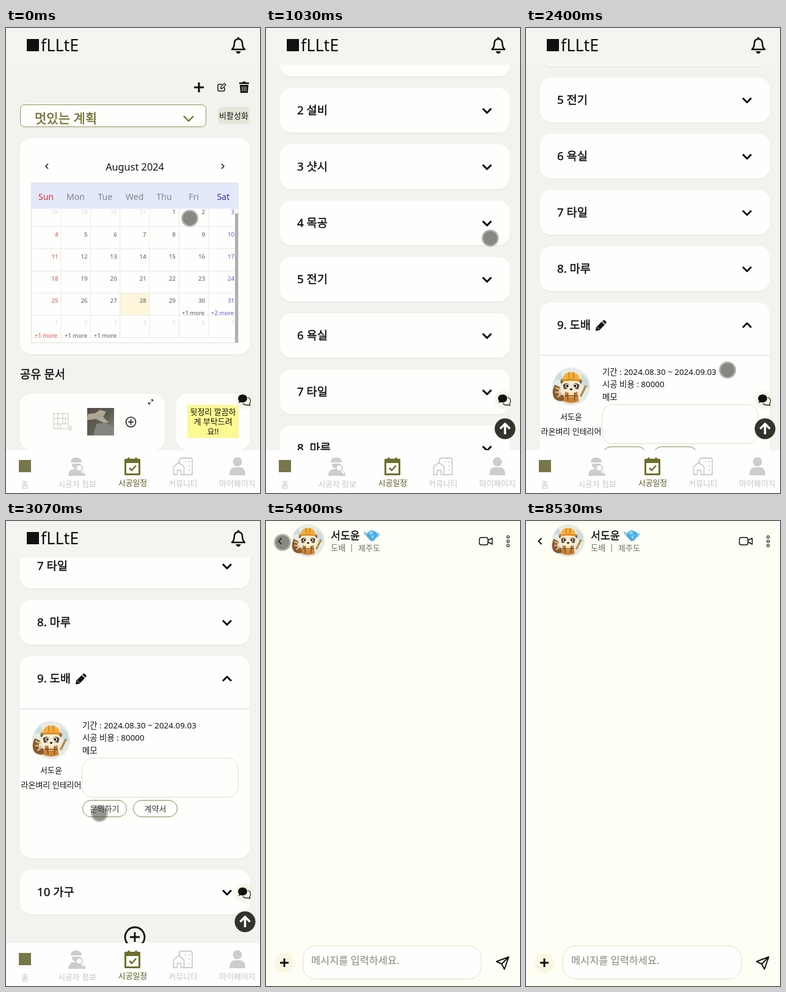
Recreate the animation shown at these times as an HTML page. Size 416x760 px, loop 8.61 s.

```html
<!DOCTYPE html>
<html lang="ko">
<head>
<meta charset="utf-8">
<style>
html, body { margin: 0; width: 100%; height: 100%; overflow: hidden; background: #f2f2ef }
svg { display: block; font-family: "Noto Sans", "Noto Sans CJK KR", "Noto Sans CJK", sans-serif }
text { white-space: pre }
</style>
</head>
<body>
<svg id="stage" width="416" height="760" viewBox="0 0 416 760"></svg>
<script>
const INK = '#111110', OLIVE = '#6f6f2c', PALE = '#cdcdc9', PAPER = '#fefefd', PAGE = '#f2f2ef';
const PERSON = '서도윤', SHOP = '라온벼리 인테리어';
const LOOP = 8610, BLANK_AT = 3450, CHAT_AT = 4000;

// Drawing helpers; text is placed by its vertical centre, medium weight is a hairline outline.
const text = (x, cy, size, str, fill = INK, anchor = 'start', medium = false) =>
  `<text x="${x}" y="${cy + size * .36}" font-size="${size}" fill="${fill}" text-anchor="${anchor}"${medium ? ` stroke="${fill}" stroke-width=".45"` : ''}>${str}</text>`;
const rect = (x, y, w, h, r, fill, stroke = 'none', extra = '') =>
  `<rect x="${x}" y="${y}" width="${w}" height="${h}" rx="${r}" fill="${fill}" stroke="${stroke}" ${extra}/>`;
const circle = (x, y, r, fill, stroke = 'none', sw = 1) =>
  `<circle cx="${x}" cy="${y}" r="${r}" fill="${fill}" stroke="${stroke}" stroke-width="${sw}"/>`;
const line = (d, stroke = INK, sw = 2, fill = 'none') =>
  `<path d="${d}" fill="${fill}" stroke="${stroke}" stroke-width="${sw}" stroke-linejoin="round"/>`;
const fillPath = (d, fill = INK) => `<path d="${d}" fill="${fill}"/>`;
const group = (x, y, body, id = '') => `<g id="${id}" transform="translate(${x} ${y})">${body}</g>`;
const card = (x, y, w, h, id = '') =>
  rect(x, y + 1.5, w, h, 18, '#e8e8e4', 'none', id && `id="${id}Edge"`) +
  rect(x, y, w, h, 18, PAPER, 'none', id && `id="${id}"`);
const down = (x, y, w, sw, color = INK) => line(`M${x - w} ${y - w / 2}l${w} ${w}l${w} ${-w}`, color, sw);
const plus = (x, y, r, sw) => line(`M${x - r} ${y}h${2 * r}M${x} ${y - r}v${2 * r}`, INK, sw);
const expand = (x, y) => line(`M${x + .5} ${y - 3.5}h3v3M${x + 3.5} ${y - 3.5}l-3 3M${x - .5} ${y + 3.5}h-3v-3M${x - 3.5} ${y + 3.5}l3 -3`, INK, 1);

const raccoon = (x, y, r) => `<g transform="translate(${x} ${y}) scale(${r / 31})">` +
  circle(0, 0, 31, '#e6ebe6') +
  fillPath('M-27 -12L-18 -24L-12 -10zM15 -22L27 -12L29 3L19 0z', '#cbdcdc') + '<g transform="scale(.9)">' +
  line('M-13 20C-31 25 -30 9 -25 -1', '#8a5a30', 11) +
  line('M-29 2l10 4M-29 10l10 1M-25 19l8 -6', '#dcb47a', 3) +
  fillPath('M-11 9h22l3 18q-14 6 -28 0z', '#cd8434') +
  fillPath('M-6 10h12v9h-12z', '#f3dfa9') + line('M-12 17H12M-6 9v17M6 9v17', '#74451d', 1.6) +
  circle(-15, -9, 4.5, '#74553a') + circle(15, -9, 4.5, '#74553a') +
  `<ellipse cy="-1" rx="18" ry="13" fill="#f8edd2"/>` +
  fillPath('M-15 -3Q-8 -9 -3 -3Q-5 5 -13 5zM15 -3Q8 -9 3 -3Q5 5 13 5z', '#5b452f') +
  circle(-7, -1, 3.6, '#fff') + circle(7, -1, 3.6, '#fff') + circle(-7, -1, 2.3, '#161006') + circle(7, -1, 2.3, '#161006') +
  `<ellipse cy="5" rx="2.5" ry="1.7" fill="#24180c"/>` +
  fillPath('M-16 -10Q-15 -26 0 -26Q15 -26 16 -10z', '#f6ad38') + line('M-19 -10Q0 -15 19 -10M-4 -26v11M4 -26v11', '#d0821f', 2) +
  line('M17 18L27 -2', '#b48d4c', 4) + '</g></g>';

function calendar() {
  const xs = i => 41.5 + i * 48.4, rule = '#e8e8ea', red = '#e04a3c', blue = '#5a5ad0', grey = '#565650';
  let out = card(23, 180, 376, 353) + text(211, 227, 16.3, 'August 2024', INK, 'middle') +
    line('M69 222l-4 4l4 4M353 222l4 4l-4 4', INK, 1.5) +
    rect(xs(3), 434, 48.4, 36, 0, '#fdf6da') + rect(41.5, 253.5, 339, 42, 0, '#e1e9fb');
  for (let i = 1; i < 7; i++) out += line(`M${xs(i)} 253V506`, rule, 1);
  for (let i = 0; i < 6; i++) out += line(`M41 ${324.5 + i * 36.3}H380`, rule, 1);
  out += rect(41.5, 253.5, 339, 261, 0, 'none', '#dfdfdf');
  ['Sun', 'Mon', 'Tue', 'Wed', 'Thu', 'Fri', 'Sat'].forEach((d, i) =>
    out += text(xs(i) + 24, 275.5, 14, d, i ? i == 6 ? '#3030a4' : '#868686' : '#e0302c', 'middle'));
  for (let i = 0; i < 42; i++) {
    const n = (i + 27) % 31 + 1, col = i % 7, otherMonth = i < 4 || i > 34;
    const ink = col ? col == 6 ? [blue, '#d8d8f0'] : [grey, '#dcdcd8'] : [red, '#f4d4cc'];
    out += text(85.5 + col * 48.1, 301 + (i / 7 | 0) * 36.2, 9.7, n, ink[+(otherMonth && i != 6)], 'end');
  }
  const more = (x, y, n, c = grey) => text(x, y, 9.5, `+${n} more`, c);
  return out + more(288, 466, 1) + more(336, 466, 2, blue) + more(47, 503, 1, red) + more(96, 503, 1) + more(144, 503, 1) +
    rect(375, 303, 5, 211, 0, '#b0b0ac', 'none', 'id="bar"');
}

const documents = () => text(23, 566, 18.8, '공유 문서', INK, 'start', true) +
  card(23, 598, 237, 92) + card(279, 598, 120, 92) +
  line('M78 630h24v25h-24zM78 638h24M85 630v25M93 630v17M78 647h24M97 638v9M89 647v8M104 651h3v6h-3z', '#c6c6b8', 1) +
  rect(133, 621, 44, 45, 0, 'url(#photo)') +
  fillPath('M134 631l13 -2l7 -5l10 3l-5 9l9 8l-6 2l-15 -7l-14 2z', '#b0a696') +
  fillPath('M143 666l5 -19l15 -2l14 7v14z', '#858480') +
  circle(204.5, 644, 8, 'none', INK, 1.5) + plus(204.5, 644, 4.5, 1.5) + expand(237, 611) +
  rect(297, 616, 84, 54, 0, '#fcf992') +
  ['뒷정리 깔끔하', '게 부탁드려', '요!!'].map((s, i) => text(339, 627.5 + i * 15.7, 13, s, INK, 'middle')).join('') +
  expand(387, 611) +
  text(399, 722, 19.3, '총 시공 가격 : 340,000원', INK, 'end', true);

const planBar = () => plus(316, 97, 8, 3.2) +
  line('M354 92h-5q-2 0 -2 2v7q0 2 2 2h7q2 0 2 -2v-4', INK, 1.5) + line('M351.5 99l.5 -3l5.5 -5.5l2.5 2.5l-5.5 5.5z', INK, 1.3) +
  fillPath('M382 89h5l1 -1.5h4l1 1.5h5v2.5h-16zM383 93h14l-1 13h-12z') + line('M387 95.5v8M390 95.5v8M393 95.5v8', PAGE, 1) +
  rect(23.5, 125.5, 304, 36, 7, PAPER, '#96965a') + text(47, 147, 21, '멋있는 계획', OLIVE, 'start', true) +
  down(299, 148, 8, 2.4, OLIVE) +
  rect(347, 129, 52, 28, 8, '#e6e6d8') + text(373, 143, 13, '비활성화', INK, 'middle');

const taskTitle = (y, title) => text(51, y + 36, 18.7, title, INK, 'start', true);
const task = (y, title) => card(23, y, 376, 73) + taskTitle(y, title) + down(362, y + 37, 7, 3);
const pill = (x, label) => rect(x + .5, 235.5, 72, 27, 13.5, PAPER, '#8a8a50') + text(x + 36.5, 249, 13, label, '#333', 'middle');

const openTask = () => card(23, 0, 376, 73, 'openCard') + taskTitle(0, '9. 도배') +
  fillPath('M114 46l1 -6l9 -9l5 5l-9 9zM125 30l3 -2l4 4l-2 3z') + line('M117 40l3 3', PAPER, 1) +
  `<g id="arrow">${down(0, 0, 7, 3)}</g><g clip-path="url(#open)">` +
  line('M23 86H399', '#dededa', 1.5) + raccoon(74, 137, 31) +
  text(74, 186.5, 13, PERSON, INK, 'middle') + text(74, 210.5, 13, SHOP, INK, 'middle') +
  text(125, 113, 13.4, '기간 : 2024.08.30 ~ 2024.09.03') + text(125, 133, 13.4, '시공 비용 : 80000') + text(125, 154, 13.4, '메모') +
  rect(124.5, 166.5, 256, 64, 18, PAPER, '#dedec8') + pill(125, '문의하기') + pill(208, '계약서') + '</g>';

const header = rect(0, 0, 416, 60, 0, '#f4f4f1') + rect(34, 18, 20, 20, 0, INK) + text(57, 28, 27, 'fLLtE') +
  line('M370 35q4 -3 4 -11q1 -6 6.5 -6q5.5 0 6.5 6q0 8 4 11z', INK, 2.5) + line('M380.5 15v3', INK, 3) + fillPath('M376.5 38h8q-1 4 -4 4t-4 -4z');

const nav = rect(0, 690, 416, 70, 0, '#fefefe') + rect(21, 706, 20, 20, 0, '#77774a') +
  fillPath('M106 710q0 -7 7 -8h4q7 1 7 8zM108 712h14q0 8 -7 8t-7 -8zM102 732q0 -10 8 -11h10q10 1 10 11z', PALE) +
  circle(120, 719, 5, '#fefefe', PALE, 2) + line('M123.5 723l4 5', '#fefefe', 2.5) +
  line('M195.5 705.5h23v24h-23z', OLIVE, 3) + line('M195 708.5h24', OLIVE, 5) + line('M201 702v4M213 702v4', OLIVE, 3) + line('M202 719l4 4l7 -8', OLIVE, 2.5) +
  line('M284 711V706q0 -3 3 -3h15q3 0 3 3v24h-16M274.5 717l8.5 -7l8.5 7v13h-5v-7h-6v7h-6zM293 709h2M299 709h2M299 716h2M299 723h2', PALE, 1.8) +
  circle(379, 709, 7.5, PALE) + fillPath('M366 731q0 -13 9 -13h8q9 0 9 13z', PALE) +
  [[31, 746, '홈'], [116.5, 745, '시공자 정보'], [207.5, 743.5, '시공일정', '#55551c'], [290, 744, '커뮤니티'], [379, 744, '마이페이지']]
    .map(([x, y, s, c = '#c4c4c0']) => text(x, y, 12.9, s, c, 'middle')).join('');

const floating = circle(390, 608, 18, 'url(#halo)') +
  line('M396 603.5q5 2 4.5 7q0 2.5 -2 4l1.5 2.5l-4.5 -1q-5 1 -7.5 -2.5', '#333', 1.3) +
  fillPath('M380.5 613l1.5 -3q-2 -2 -2 -5q1 -6 7.5 -6q7 0 7.5 6.5q-.5 6.5 -7.5 6.5q-2 0 -3.5 -.5z') +
  `<g id="top">${circle(391.5, 655, 17, '#33332c')}${line('M391.5 664v-17M383.5 655l8 -8l8 8', PAPER, 3.6)}</g>`;

const chat = line('M25.5 28l-5 5l5 5', INK, 2) + raccoon(69, 32, 27) +
  text(106, 24, 17.3, PERSON, INK, 'start', true) +
  fillPath('M168 22l-8 -6l1 6l6 5zM180 18l7 3l-3 5l-6 2z', '#8accf0') + fillPath('M166 19l6 -4l7 2l4 6l-6 9l-5 1l-7 -8z', '#4aaae8') + fillPath('M168 19l5 -3l3 4l-5 3zM172 25l6 -3l-3 8z', '#8bd3f6') +
  text(106, 44, 13.3, '도배', '#6e6e66') + text(140, 43, 13, '|', '#6e6e66', 'middle') + text(151, 44, 13, '제주도', '#6e6e66') +
  rect(349.5, 27, 14, 12, 3, 'none', INK, 'stroke-width="1.5"') + line('M364 31.5l6.5 -3.5v10l-6.5 -3.5', INK, 1.5) +
  [26, 33, 40].map(y => circle(396.5, y, 2, 'none', INK, 1.1)).join('') +
  circle(30, 722, 16, '#f8f8e2') + plus(30, 722, 7, 3) +
  rect(60.5, 694.5, 292, 54, 20, PAPER, '#dcdccc') + text(74, 718.5, 16.4, '메시지를 입력하세요.', '#85857a') +
  line('M377.5 720l20 -7.5l-7 20l-4.5 -8.5zM386 724l11 -11', INK, 2);

const names = ['1 철거', '2 설비', '3 샷시', '4 목공', '5 전기', '6 욕실', '7 타일', '8. 마루'];
const $ = id => document.getElementById(id);
$('stage').innerHTML = `<defs>
  <linearGradient id="photo" x2="1" y2="1"><stop stop-color="#50504a"/><stop offset=".5" stop-color="#5d5c54"/><stop offset="1" stop-color="#8e8d86"/></linearGradient>
  <radialGradient id="halo"><stop offset=".6" stop-color="#f3f3e4"/><stop offset="1" stop-color="#f3f3e4" stop-opacity="0"/></radialGradient>
  <clipPath id="open"><rect id="openClip" x="23" y="74" width="376" height="0"/></clipPath></defs>` +
  rect(0, 0, 416, 760, 0, PAGE) +
  group(0, 0, planBar() + calendar() + documents() + names.map((n, i) => task(754 + i * 92, n)).join('') +
    group(0, 1490, openTask()) +
    group(0, 0, task(0, '10 가구') + circle(211, 110, 16, 'none', INK, 2.8) + plus(211, 110, 8, 2.8), 'tail'), 'page') +
  header + nav + floating + rect(0, 0, 416, 760, 0, '#fefef4', 'none', 'id="blank"') + `<g id="chat">${chat}</g>` +
  `<g id="touch"><g opacity=".4">${circle(0, 0, 14, '#4a4a44')}</g><g opacity=".4">${circle(0, 0, 11.5, '#44443c')}</g></g>`;

const clamp = v => Math.max(0, Math.min(1, v));
const mix = (a, b, p) => a + (b - a) * p;
const show = (id, on) => $(id).style.display = on ? '' : 'none';
// Scroll position over time: quick swipes, each followed by a fling.
const scrollKeys = [[0, 0], [520, 0], [600, 97], [660, 190], [840, 445], [945, 570], [1030, 746],
  [1100, 880], [1180, 980], [1300, 1040], [2400, 1040], [2560, 1200], [2720, 1269]];
// Each touch: start, end, from x, y, to x, y.
const touches = [[0, 200, 301, 311, 306, 290], [510, 640, 326, 322, 340, 170], [945, 1090, 356, 500, 375, 236],
  [1830, 1890, 362, 487, 362, 487], [2400, 2560, 330, 560, 345, 400], [2990, 3060, 153, 478, 153, 478], [5200, 5400, 27, 35, 27, 35]];

function along(keys, t) {
  const i = keys.findIndex(k => k[0] > t);
  if (i < 0) return keys.at(-1)[1];
  const [a, b] = [keys[i - 1], keys[i]];
  return mix(a[1], b[1], (t - a[0]) / (b[0] - a[0]));
}

function draw(t) {
  const y = along(scrollKeys, t), p = clamp((t - 1880) / 220), open = p * p * (3 - 2 * p), h = mix(73, 330, open);
  $('page').setAttribute('transform', `translate(0 ${-y})`);
  $('bar').setAttribute('opacity', 1 - clamp((t - 300) / 200));
  $('openCard').setAttribute('height', h);
  $('openCardEdge').setAttribute('height', h);
  $('openClip').setAttribute('height', h - 73);
  $('arrow').setAttribute('transform', `translate(362 37) scale(1 ${p > 0 ? -1 : 1})`);
  $('tail').setAttribute('transform', `translate(0 ${1509 + h})`);
  show('top', y > 30);
  show('blank', t >= BLANK_AT);
  show('chat', t >= CHAT_AT);

  const touch = touches.find(([a, b]) => t >= a && t < b + 120);
  show('touch', touch);
  if (touch) {
    const [a, b, x0, y0, x1, y1] = touch, q = clamp((t - a) / (b - a));
    $('touch').setAttribute('transform', `translate(${mix(x0, x1, q)} ${mix(y0, y1, q)})`);
    $('touch').setAttribute('opacity', 1 - clamp((t - b) / 120));
  }
}

const start = performance.now();
function tick() {
  draw((performance.now() - start) % LOOP);
  requestAnimationFrame(tick);
}
tick();
</script>
</body>
</html>
```
